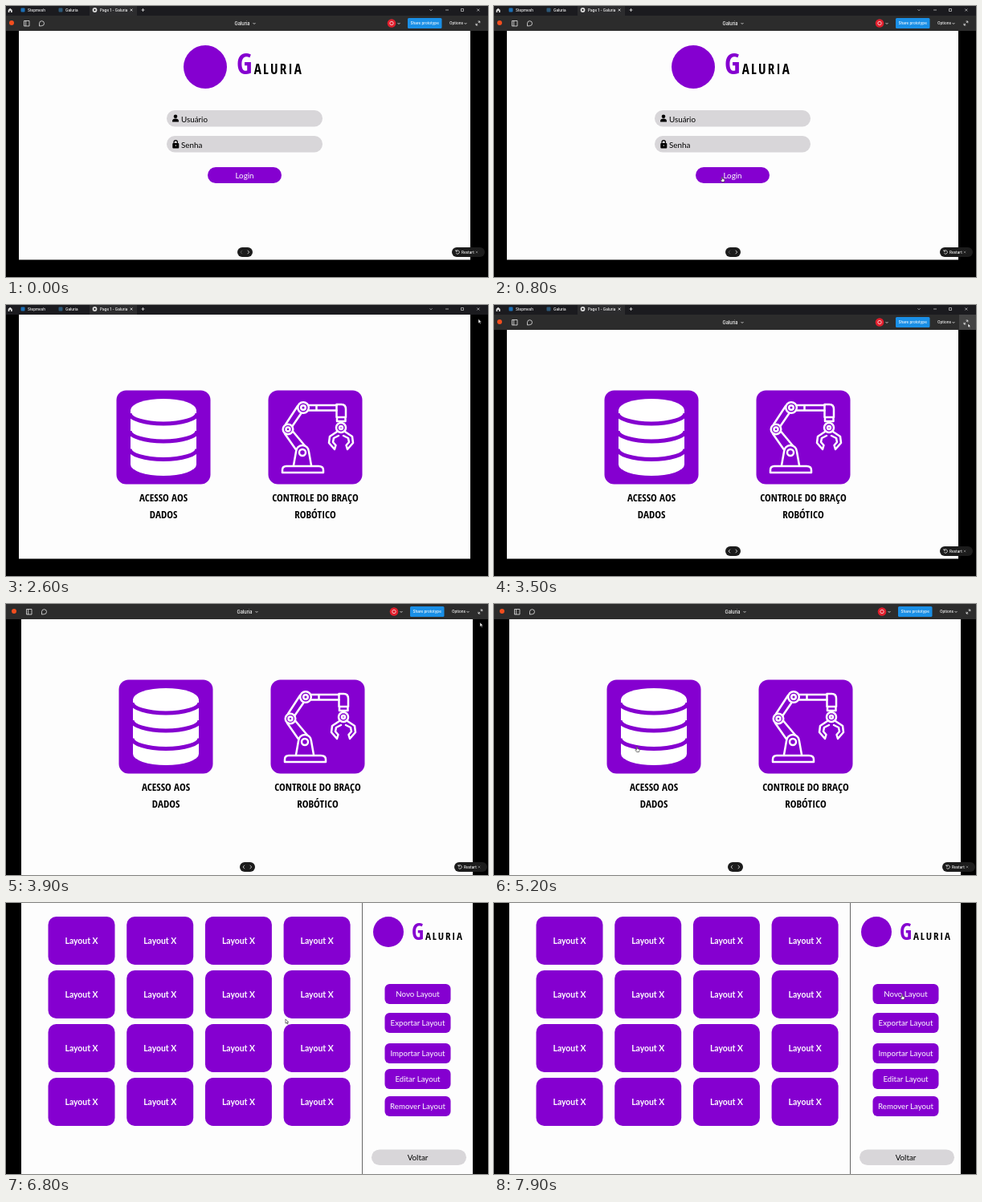
Write an HTML page that moves like this. It is 600 px wide and 338 px high and loops after 8000 ms.

```html
<!DOCTYPE html>
<html lang="pt">
<head>
<meta charset="utf-8">
<title>Galuria</title>
<style>
  html, body { margin: 0; width: 100%; height: 100%; overflow: hidden; background: #000; }
  svg { display: block; width: 600px; height: 338px; }
  text { font-family: Lato, "Open Sans", sans-serif; font-size: 9.8px; }
  .ui text { font-family: Inter, Roboto, sans-serif; font-size: 4.6px; font-weight: 500; fill: #fff; }
  .ui .title { font-size: 5.6px; }
  .display, .display tspan {
    font-family: "Open Sans Condensed", "Roboto Condensed", "Open Sans", Roboto, sans-serif;
    font-stretch: 75%; font-weight: 700;
  }
  .mid { text-anchor: middle; }
  .line { fill: none; stroke: #fff; stroke-width: .7; }
  .arm { fill: none; stroke: #fff; stroke-width: 2.5; stroke-linejoin: round; stroke-linecap: round; }
  .purple { fill: #8500d0; }
  .grey { fill: #d8d6d9; }
  .white { fill: #fff; }
</style>
</head>
<body>
<svg viewBox="0 0 600 338">
  <rect width="600" height="338"/>
  <rect id="page" fill="#fdfdfd"/>

  <g id="login">
    <circle class="purple" cx="248" cy="76" r="27"/>
    <text class="display" x="287" y="85" font-size="17" style="font-size:17px;letter-spacing:2.2px"><tspan class="purple" style="font-size:36px">G</tspan>ALURIA</text>
    <rect class="grey" x="200" y="130" width="194" height="20.5" rx="10"/>
    <rect class="grey" x="200" y="162" width="194" height="20.5" rx="10"/>
    <circle cx="211" cy="137.7" r="2.3"/>
    <path d="M207 144.5v-1q0-3 4-3t4 3v1z"/>
    <rect x="207.3" y="171" width="8" height="6.5" rx="1"/>
    <path d="M209 171.5v-1.7a2.2 2.2 0 0 1 4.4 0v1.7" fill="none" stroke="#000" stroke-width="1.2"/>
    <circle cx="211.3" cy="174" r=".8" class="grey"/>
    <text x="218" y="144.5">Usuário</text>
    <text x="218" y="176.5">Senha</text>
    <rect class="purple" x="251" y="201" width="92" height="20" rx="10"/>
    <text class="mid white" x="297" y="215">Login</text>
  </g>

  <g id="menu">
    <rect class="purple" x="137.5" y="106.5" width="117" height="117" rx="12"/>
    <path class="white" d="M155 131a41 14 0 0 1 82 0v68a41 14 0 0 1-82 0z"/>
    <path d="M154 135a42 13 0 0 0 84 0M154 157a42 13 0 0 0 84 0M154 179.500a42 13 0 0 0 84 0" fill="none" stroke="#8500d0" stroke-width="5"/>
    <rect class="purple" x="326.500" y="106.500" width="117" height="117" rx="12"/>
    <g class="arm">
      <path d="M344 209v-3q0-5 5-5h40q6 0 6 5v3z"/>
      <path d="M358 200l3-17a8 8 0 0 1 16 0l3 17"/>
      <circle cx="369" cy="184" r="4"/>
      <circle cx="351" cy="155" r="6.300"/><circle cx="351" cy="155" r="2.500"/>
      <circle cx="370" cy="128" r="6.800"/><circle cx="370" cy="128" r="2.800"/>
      <path d="M347 160.500l14 20M357 157.500l15 18M348 149l15-23M356.500 151l11-16"/>
      <path d="M376.500 125h10v6.500h-10M386.500 125h25M386.500 131.500h25"/>
      <path d="M411.500 124h6q5.500 0 5.500 6v10h-11.500zM412 140v5h10.500v-5"/>
      <circle cx="417" cy="153" r="6"/><circle cx="417" cy="153" r="2"/>
      <path id="claw" d="M412 158l-9 6-1 8 7 8 1.500-5-3.500-4 1-5 6-3"/>
      <use href="#claw" transform="matrix(-1 0 0 1 834 0)"/>
    </g>
    <g class="mid">
      <text class="display" x="196" y="245">ACESSO AOS</text>
      <text class="display" x="196" y="266">DADOS</text>
      <text class="display" x="385" y="245">CONTROLE DO BRAÇO</text>
      <text class="display" x="385" y="266">ROBÓTICO</text>
    </g>
  </g>

  <g id="data">
    <text class="display mid" x="300" y="88.500" style="font-size:19px;letter-spacing:.6px">ACESSO DE DADOS</text>
    <rect class="purple" x="228" y="93" width="143.500" height="2"/>
    <rect class="purple" x="240.500" y="133" width="117.500" height="19.500" rx="6"/>
    <rect class="purple" x="240.500" y="161.500" width="117.500" height="19.500" rx="6"/>
    <rect class="grey" x="241.500" y="190" width="117" height="19.500" rx="6"/>
    <text class="mid white" x="298" y="146.500">Layouts</text>
    <text class="mid white" x="300.500" y="175">Registros de Atividades</text>
    <text class="mid" x="300.500" y="203.500">Voltar</text>
  </g>

  <g id="layouts">
    <g id="cards"></g>
    <rect x="443" width="1" height="338" fill="#666"/>
    <circle class="purple" cx="476" cy="36" r="19"/>
    <text class="display" x="505" y="46" style="font-size:13px;letter-spacing:1.800px"><tspan class="purple" style="font-size:28px">G</tspan>ALURIA</text>
    <rect class="grey" x="455" y="307.500" width="118" height="19.500" rx="10"/>
    <text class="mid" x="512.500" y="321">Voltar</text>
  </g>

  <g id="toolbar" class="ui">
    <rect x="-4" y="12" width="608" height="19" fill="#2c2c2c"/>
    <rect id="hover" x="579" y="12" width="21" height="19" fill="#444"/>
    <circle cx="7" cy="21" r="3" fill="#f24e1e"/>
    <path class="line" d="M22.500 18.500h6.500v6.500h-6.500zM24.700 18.500v6.500"/>
    <path class="line" d="M41.500 25v-3.500a3 3 0 1 1 3 3.200z"/>
    <text class="title mid" x="294" y="23.600">Galuria</text>
    <path class="line" d="M307.500 21l1.500 1.500 1.500-1.500M487.500 21l1.500 1.500 1.500-1.500M570.500 21l1.500 1.500 1.500-1.500"/>
    <circle cx="480" cy="21.500" r="5.300" fill="#e01f2d"/>
    <circle class="line" cx="480" cy="21.500" r="2.200"/>
    <rect x="500" y="15" width="42.500" height="13" rx="1.500" fill="#1a8fe6"/>
    <text class="mid" x="521.200" y="23.200">Share prototype</text>
    <text x="552" y="23.200">Options</text>
    <path class="line" d="M587.500 19h2.300v2.300M589.800 19l-2 2M585 21.700v2.300h2.300M585 24l2-2"/>
  </g>

  <g id="controls" class="ui">
    <rect x="288" y="301" width="19" height="12" rx="6" fill="#1c1c1c"/>
    <path id="back" class="line" d="M294 304.800l-2 2.200 2 2.200"/>
    <path class="line" d="M300.700 304.800l2 2.200-2 2.200" stroke-width="1"/>
    <rect x="555" y="301" width="41" height="12" rx="6" fill="#1c1c1c"/>
    <path class="line" d="M560.500 305.500a2.200 2.200 0 1 1-.3 2.500M560 304v2h2"/>
    <text x="567" y="308.700">Restart</text>
    <path class="line" d="M584.700 305.700l2.600 2.600M587.300 305.700l-2.600 2.600" opacity=".45"/>
  </g>

  <g id="tabs" class="ui">
    <rect width="600" height="12" fill="#1b1b1f"/>
    <rect x="104" width="59" height="12" fill="#2c2c2e"/>
    <path d="M2.700 5l2.500-2.300L7.700 5v3H6V6H4.400v2H2.700z" fill="#ddd"/>
    <rect x="18.500" y="2.500" width="5" height="5" rx="1" fill="#1c6fb5"/>
    <rect x="65.500" y="2.500" width="5" height="5" rx="1" fill="#2d5878"/>
    <circle cx="110.500" cy="5" r="2.900" fill="#ddd"/>
    <path d="M109.700 3.600l2.300 1.400-2.300 1.400z"/>
    <text x="27" y="6.700">Stepmesh</text>
    <text x="74" y="6.700">Galuria</text>
    <text x="117" y="6.700">Page 1 - Galuria</text>
    <path class="line" d="M154.700 3.600l2.800 2.800M157.500 3.600l-2.800 2.800M168.500 5h4M170.500 3v4"/>
    <path class="line" d="M527.500 4.300l1.500 1.500 1.500-1.500M547 5h4M566.500 3.500h3v3h-3zM586.300 3.500l3 3M589.300 3.500l-3 3" opacity=".8"/>
  </g>

  <g id="cursor" stroke="#222" stroke-width=".6" fill="#fff" stroke-linejoin="round">
    <path id="arrow" d="M0 0v5.300l1.300-1.100.9 1.900.9-.4-.9-1.900h1.600z"/>
    <path id="hand" d="M-.6.300q.6-.6 1.200 0v2.200l2.200.6q.5.300.3 1.200l-.6 2.200H-.4L-2 4.300q0-.8.700-.6l.7.500z"/>
  </g>
</svg>
<script>
const LOOP = 8000;
const NS = "http://www.w3.org/2000/svg";
const $ = id => document.getElementById(id);

function add(parent, tag, attrs, text = "") {
  const el = document.createElementNS(NS, tag);
  for (const k in attrs) el.setAttribute(k, attrs[k]);
  el.textContent = text;
  parent.append(el);
}

function button(x, y, w, h, r, label, size, weight) {
  add($("cards"), "rect", { class: "purple", x, y, width: w, height: h, rx: r });
  add($("cards"), "text", {
    class: "mid white", x: x + w / 2, y: y + h / 2 + 3.8,
    style: `font-size:${size}px;font-weight:${weight}`
  }, label);
}

for (let i = 0; i < 16; i++)
  button(52.5 + i % 4 * 97.7, 17 + (i >> 2) * 67, 83, 60, 10, "Layout X", 10.4, 700);
["Novo", "Exportar", "Importar", "Editar", "Remover"].forEach((verb, i) =>
  button(471.5, [101, 137, 175, 207, 241][i], 82, 25, 6, verb + " Layout", 9.7, 400));

document.querySelectorAll("#menu .display").forEach(el => el.style.fontSize = "13px");

// Rows are [time, ...values]; values ease between rows.
const path = [
  [0, 312, 231], [300, 312, 231], [800, 284, 213], [1400, 283, 212],
  [1900, 283, 212], [2500, 588, 17.5], [3300, 588, 17.5], [3500, 590, 23],
  [3900, 590, 23], [4500, 184, 177.5], [4700, 178, 178], [5400, 178, 178],
  [6000, 343, 155], [6200, 326, 150], [6300, 319.5, 149.5], [6600, 319.5, 149.5],
  [7400, 500, 120], [7700, 508, 114], [8000, 508, 114]
];
const chrome = [[0, 1], [1300, 1], [2000, 0], [2800, 0], [3150, 1], [5350, 1], [5950, 0], [8000, 0]];
const screens = [["login", 0], ["menu", 1000], ["data", 5300], ["layouts", 6500]];

function at(rows, t) {
  const i = rows.findIndex(r => r[0] > t);
  const a = rows[i - 1], b = rows[i];
  const p = (t - a[0]) / (b[0] - a[0]);
  const e = p * p * (3 - 2 * p);
  return a.slice(1).map((v, k) => v + (b[k + 1] - v) * e);
}

const show = (id, on) => $(id).setAttribute("visibility", on ? "visible" : "hidden");
const move = (id, x, y) => $(id).setAttribute("transform", `translate(${x} ${y})`);

function draw(t) {
  const full = t >= 3800;
  const dx = full ? 3 : 0, dy = full ? -12 : 0;
  const box = full ? [19, 0, 562, 338] : [16, 12, 562, 304.5];
  ["x", "y", "width", "height"].forEach((k, i) => $("page").setAttribute(k, box[i]));

  screens.forEach(([id, start], i) =>
    show(id, t >= start && t < (screens[i + 1] || [0, LOOP])[1]));
  move("menu", dx, dy);
  move("toolbar", dx, dy);
  move("controls", dx, full ? 21 : 0);
  show("tabs", !full);
  $("hover").setAttribute("opacity", t >= 3300 && t < 3800 ? 1 : 0);
  $("back").setAttribute("opacity", t < 2500 ? .35 : 1);

  const [alpha] = at(chrome, t);
  $("toolbar").setAttribute("opacity", alpha);
  $("controls").setAttribute("opacity", alpha);

  const [x, y] = at(path, t);
  const hand = t > 600 && t < 1000 || t > 4350 && t < 5450 || t > 7350;
  move("cursor", x, y);
  show("arrow", !hand && t >= 100);
  show("hand", hand);
}

function tick() {
  draw(performance.now() % LOOP);
  requestAnimationFrame(tick);
}
tick();
</script>
</body>
</html>
```
